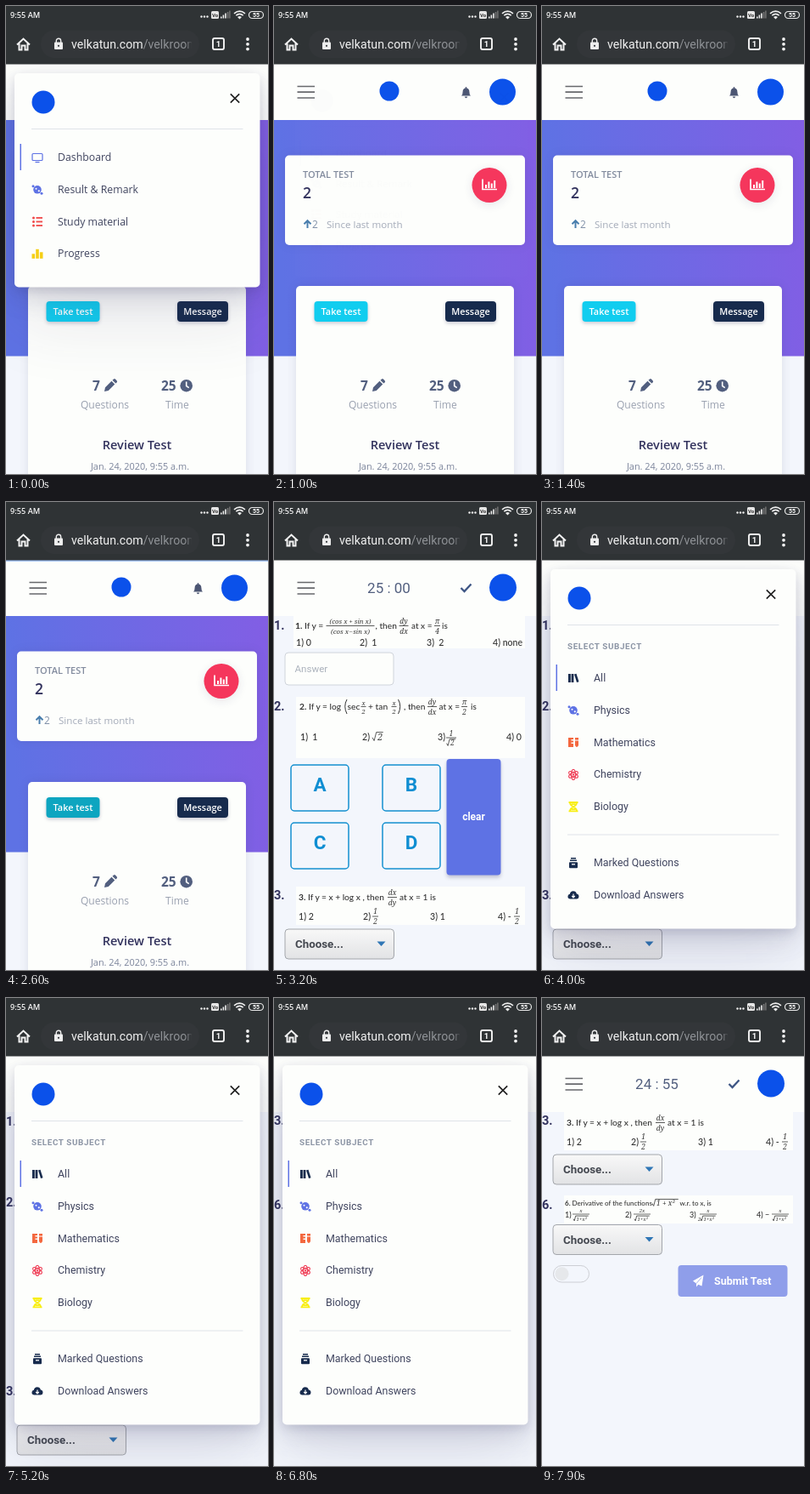
An HTML page that plays this animation: 309x550 px, repeating every 8000 ms.

```html
<!DOCTYPE html>
<html lang="en">
<head>
<meta charset="utf-8">
<title>Study portal</title>
<style>
html,body{margin:0;width:100%;height:100%;overflow:hidden;background:#fff}
svg{display:block;width:100vw;height:100vh}
text{white-space:pre}
.o{font-family:"Open Sans",sans-serif}
.r{font-family:Roboto,sans-serif}
.l{font-family:Lato,sans-serif}
.m{font-family:"Noto Serif","Liberation Serif",serif;font-style:italic}
</style>
</head>
<body>
<svg id="stage" viewBox="0 0 309 550" xmlns="http://www.w3.org/2000/svg"></svg>
<script>
const LOOP = 8000;
const T = {close1: 780, press: 2400, load: 2850, open2: 3760, filter: 6300, close2: 7150};
const NAVY = '#172b4d', INDIGO = '#5e72e4', SLATE = '#525f7f', LOGO = '#0b51ea', INK = '#32325d';
const PAGE = '#f3f6fc', PAPER = '#fdfefc', BAR = '#2f3335', PILL = '#333639', MATH = '#333';

const text = (cls, x, y, s, size, fill, extra = '') =>
  `<text class="${cls}" x="${x}" y="${y}" font-size="${size}" fill="${fill}" ${extra}>${s}</text>`;
const rect = (x, y, w, h, fill, r = 0, extra = '') =>
  `<rect x="${x}" y="${y}" width="${w}" height="${h}" rx="${r}" fill="${fill}" ${extra}/>`;
const dot = (x, y, r, fill, extra = '') => `<circle cx="${x}" cy="${y}" r="${r}" fill="${fill}" ${extra}/>`;
const path = (d, fill, extra = '') => `<path d="${d}" fill="${fill}" ${extra}/>`;
const line = (d, color, w = 1, extra = '') => path(d, 'none', `stroke="${color}" stroke-width="${w}" ${extra}`);
const group = (id, body) => `<g id="${id}">${body}</g>`;
const at = (x, y, body) => `<g transform="translate(${x} ${y})">${body}</g>`;
const MID = 'text-anchor="middle"', SEMI = 'font-weight="600"', BOLD = 'font-weight="700"';
const MIDSEMI = MID + ' ' + SEMI, MIDBOLD = MID + ' ' + BOLD;

// Browser chrome
function chrome() {
  let s = rect(0, 0, 309, 68.5, BAR) + text('o', 5, 13.5, '9:55 AM', 9.2, '#f4f4f4', SEMI);
  for (const x of [230.5, 234, 237.5]) s += dot(x, 12.5, 1.2, '#eee');
  s += rect(242, 6, 9, 9, '#e6e6e6', 1.5) + text('r', 246.5, 13, 'Vo', 6, '#333', MIDBOLD);
  s += path('M253 14.5h1.6v-2h-1.6zM255.6 14.5h1.6v-4h-1.6zM258.2 14.5h1.6v-6h-1.6z', '#eee')
    + path('M260.8 14.5h1.6v-7.5h-1.6zM263.2 14.5h1.4v-9h-1.4z', '#777');
  s += line('M269 8.8q6.5-5.4 13 0M271.3 11.2q4.2-3.5 8.4 0', '#eee', 1.6)
    + path('M273 13q2.5-2 5 0l-2.5 2.5z', '#eee');
  s += rect(286.5, 6.5, 17, 8, 'none', 4, 'stroke="#e8e8e8" stroke-width="1.2"')
    + text('r', 295, 13.2, '55', 7, '#fff', MIDBOLD);
  s += line('M13 45.5L20.5 38.5L28 45.5M15.5 44V51.5H18.5V46.5H22.5V51.5H25.5V44', '#f2f2f2', 2);
  s += rect(41, 28.5, 187, 32.5, PILL, 16.2);
  s += rect(57, 42.5, 10, 8.5, '#eee', 1) + line('M59.3 43v-2a2.7 2.7 0 0 1 5.4 0v2', '#eee', 1.4)
    + dot(62, 46.8, 1.1, PILL);
  s += '<g clip-path="url(#urlClip)">' + text('r', 77, 50,
    'velkatun.com<tspan fill="#8e9195">/velkroom/in</tspan>', 14.2, '#f1f1f1') + '</g>'
    + rect(211, 36, 9, 18, 'url(#urlFade)');
  s += rect(244, 38, 13, 13, 'none', 2, 'stroke="#f4f4f4" stroke-width="1.9"')
    + text('r', 250.5, 48, '1', 9.5, '#fff', MIDBOLD);
  for (const y of [39, 44.8, 50.6]) s += dot(285, y, 1.9, '#f2f2f2');
  return s;
}

const burger = line('M27.5 94.5h20.5M27.5 101.2h20.5M27.5 108h20.5', '#67686c', 1.7);
const header = rect(0, 68, 309, 66, PAPER) + burger;
const shadow = (x, y, w, h, r, opacity, blur = 'soft') =>
  rect(x, y, w, h, INK, r, `opacity="${opacity}" filter="url(#${blur})"`);

function dashboard() {
  let s = rect(0, 68, 309, 482, PAGE) + rect(0, 134, 309, 277.5, 'url(#band)') + header;
  s += dot(136, 100, 11.5, LOGO) + dot(269.5, 101, 15.5, LOGO);
  s += path('M221 105.5q1.6-1.5 1.6-4.5q0-4 3.1-4.6v-1.2h1.6v1.2q3.1.6 3.1 4.6q0 3 1.6 4.5zM224.8 106.5h3.4q-.3 1.7-1.7 1.7t-1.7-1.7z', '#4c5673');
  s += shadow(13, 175.5, 283, 105.5, 5, .12) + rect(13, 175.5, 283, 105.5, PAPER, 5);
  s += text('o', 34, 202, 'TOTAL TEST', 11, '#828b9e', SEMI) + text('o', 34, 226, '2', 17.5, INK, SEMI);
  s += line('M39.5 261V253M35.5 256.2L39.5 252.2L43.5 256.2', '#4a7fae', 2)
    + text('o', 45, 260.5, '2', 12, '#8090a8') + text('o', 62, 260.5, 'Since last month', 11.6, '#a3aab8');
  s += shadow(234, 193, 40, 40, 20, .12) + dot(254, 210.5, 20.5, '#f5365c')
    + line('M246 203.5V215.5H263', '#fff', 1.7)
    + path('M249 210h2v4h-2zM252.4 206.5h2v7.5h-2zM255.8 208.5h2v5.5h-2zM259.2 205h2v9h-2z', '#fff');
  s += shadow(26, 329, 257, 240, 5, .13) + rect(26, 329, 257, 240, PAPER, 5);
  const btn = (x, w, fill, id, label) => shadow(x, 349, w, 24, 4, .25, 'tight')
    + rect(x, 347, w, 24, fill, 4, `id="${id}"`) + text('o', x + w / 2, 363, label, 10.9, '#fff', MIDSEMI);
  s += btn(47.5, 63, '#11cdef', 'take', 'Take test') + btn(202, 60, NAVY, 'msg', 'Message');
  s += text('o', 102, 452, '7', 15.5, SLATE, BOLD)
    + path('M116 453l1-4.8l7.5-7.5l3.8 3.8l-7.5 7.5zM125.5 439.7l1.5-1.3q1-.8 2 .2l1.6 1.6q1 1 .2 2l-1.4 1.4z', SLATE);
  s += text('o', 183, 452, '25', 15.5, SLATE, BOLD) + dot(212.7, 446.2, 7.3, SLATE)
    + line('M212.7 441.5V446.5L215.7 448.7', '#fff', 1.6);
  s += text('o', 116.5, 472.5, 'Questions', 12.1, '#9aa1b0', MID) + text('o', 202, 472.5, 'Time', 12.1, '#9aa1b0', MID);
  s += text('o', 154.5, 520.5, 'Review Test', 14.6, INK, MIDSEMI)
    + text('o', 158, 545, 'Jan. 24, 2020, 9:55 a.m.', 10.9, '#7a839a', MID);
  return s + rect(0, 67.5, 309, 2.5, '#a9c8f8', 0, 'id="bar"');
}

// Exam content
const lato = (x, y, s, size = 10.6) =>
  text('l', x, y, s.replace(/^\d\./, n => `<tspan ${BOLD}>${n}</tspan>`), size, MATH, 'font-weight="500"');
const frac = (cx, y, top, bottom, w, size = 8.4, gap = 1) =>
  text('m', cx, y - 6 - gap, top, size, MATH, MID) + line(`M${cx - w / 2} ${y - 4}h${w}`, MATH, .8)
  + text('m', cx, y + 4 + gap, bottom, size, MATH, MID);
const num = (y, s) => text('r', 0, y, s, 14.5, INK, BOLD);
const root = (x, y, s, w, size) => text('m', x + size * .6, y, s, size, MATH)
  + line(`M${x} ${y - size * .3}l${size * .2} ${size * .35}l${size * .25} ${-size * .95}h${w}`, MATH, .8);
const strip = (x, y, w, h) => rect(x, y, w, h, PAPER);
const choose = y => rect(13, y, 128.5, 35, 'url(#sel)', 4, 'stroke="#a3a6ab"')
  + text('r', 25, y + 22, 'Choose...', 13.3, '#43474f', BOLD)
  + path(`M121.5 ${y + 14.5}h10l-5 5.5z`, '#2f76b5');

function question1() {
  let s = strip(23, 131, 273, 41) + num(150, '1.') + lato(25, 149, '1. If y =', 10.3);
  s += frac(90, 149.5, '(cos x + sin x)', '(cos x−sin x)', 57, 7.8) + lato(119.5, 149, ', then', 10.2)
    + frac(153, 149.5, 'dy', 'dx', 11) + lato(162, 149, 'at x =', 10) + frac(192.5, 149.5, 'π', '4', 7) + lato(198, 149, 'is', 10);
  s += lato(26, 169, '1) 0') + lato(101, 169, '2)  1') + lato(180, 169, '3)  2') + lato(258, 169, '4) none');
  return s + rect(13, 177, 128, 38, PAPER, 4, 'stroke="#cfd4db"') + text('r', 24.5, 200, 'Answer', 11.6, '#abb2bc');
}

function question2() {
  const key = (x, y, c) => rect(x, y, 68, 54, PAGE, 4, 'stroke="#1490d0" stroke-width="1.5"')
    + text('r', x + 34, y + 31, c, 22.5, '#0f8ed2', MIDBOLD);
  let s = strip(26, 229, 270, 72) + num(245, '2.') + lato(30, 244, '2. If y = log', 10.2);
  s += line('M86 232q-4.5 8 0 17M146.500 232q4.5 8 0 17', MATH, 1) + lato(86.5, 244, 'sec', 10.3) + frac(105.5, 244.5, 'x', '2', 6, 7.5, 0)
    + lato(111, 244, '+ tan', 10.3) + frac(141.5, 244.5, 'x', '2', 6, 7.5, 0) + lato(153, 244, ', then', 10.2);
  s += frac(186.5, 244.5, 'dy', 'dx', 11) + lato(194.5, 244, 'at x =', 10) + frac(224.5, 244.5, 'π', '2', 7) + lato(232, 244, 'is', 10);
  s += lato(31, 280, '1)  1') + lato(104, 280, '2)') + root(116, 280, '2', 8, 10.5) + lato(193, 280, '3)')
    + text('m', 209, 274.5, '1', 8, MATH, MID) + line('M203 277h12', MATH, .8) + root(203.5, 286, '2', 7, 8) + lato(274, 280, '4) 0');
  s += key(20, 309, 'A') + key(128, 309, 'B') + key(20, 377, 'C') + key(128, 377, 'D');
  return s + shadow(203.5, 305, 64, 136.5, 4, .25, 'tight') + rect(203.5, 302, 64, 136.5, INDIGO, 4)
    + text('r', 235.5, 374, 'clear', 12, '#fff', MIDBOLD);
}

function question3() {
  let s = strip(26, 452, 270, 45) + num(467, '3.') + lato(29, 468, '3. If y = x + log x , then', 10.2);
  s += frac(139.5, 468.5, 'dx', 'dy', 11) + lato(148, 468, 'at x = 1 is', 10.2);
  s += lato(29, 491, '1) 2') + lato(105, 491, '2)') + frac(119.5, 491, '1', '2', 7) + lato(184, 491, '3) 1')
    + lato(264, 491, '4) -') + frac(286.5, 491, '1', '2', 7);
  return s + choose(502);
}

function question6() {
  const small = (cx, top, lead = '') => text('m', cx, 252, top, 6, MATH, MID) + line(`M${cx - 10} 254h20`, MATH, .7)
    + text('m', cx - 12, 261.5, lead, 6, MATH) + root(cx - 9, 261.5, '1+x²', 15, 6);
  let s = strip(26, 232, 270, 33) + num(248, '6.') + lato(27, 244, '6. Derivative of the functions', 8)
    + root(130, 244, '1 + x²', 27, 8.4) + lato(162.5, 244, 'w.r. to x, is', 8);
  s += lato(27, 257.5, '1)', 9) + small(46, 'x') + lato(98, 257.5, '2)', 9) + small(118, '2x')
    + lato(174, 257.5, '3)', 9) + small(196, 'x', '2') + lato(253, 257.5, '4) −', 9) + small(281, 'x');
  s += choose(266.5) + rect(13.5, 314.5, 42, 19.5, PAGE, 9.7, 'stroke="#cdcfd4"') + dot(23.5, 324.2, 8, '#e6e8eb');
  s += rect(160.5, 314, 129, 37, '#8f9eea', 4) + path('M178 332.5l12.5-7l-2 13l-4.2-1.8l-2.3 2.8v-4z', '#fff')
    + line('M182 335.5l6-7', '#8f9eea', .8);
  return s + text('r', 203, 336.5, 'Submit Test', 12.5, '#fff', BOLD);
}

function exam() {
  let s = rect(0, 68, 309, 482, PAGE) + group('firstSet', question1() + question2())
    + group('third', question3()) + group('last', question6()) + header;
  s += `<text id="clock" class="r" x="135.5" y="107" font-size="17" fill="${SLATE}" ${MID}></text>`;
  return s + line('M220.5 101l4 4l8-8.5', '#3d5584', 2.3) + dot(270, 100.5, 16, LOGO);
}

// Menus
const icon = {
  screen: rect(-6, -4.5, 12, 8, 'none', 1, `stroke="${INDIGO}" stroke-width="1.2"`) + line('M-2.5 5.5h5', INDIGO, 1.3),
  planet: dot(0, 0, 4.8, INDIGO) + dot(-5, -4, 1.5, INDIGO) + dot(5, 4.5, 1.5, INDIGO) + dot(-1.5, -1, 1, '#fff') + dot(1.8, 1.5, 1.1, '#fff'),
  list: [-4.5, 0, 4.5].map(y => dot(-4.5, y, 1.5, '#f04848') + rect(-1.5, y - .9, 7.5, 1.8, '#f04848')).join(''),
  bars: rect(-6.5, 0, 3.6, 5.5, '#f5cf16') + rect(-1.8, -5.5, 3.6, 11, '#f5cf16') + rect(2.9, -2, 3.6, 7.5, '#f5cf16'),
  books: rect(-6, -5, 2.8, 10, NAVY) + rect(-2.4, -5, 2.8, 10, NAVY) + path('M1-4.5l2.5-.8l3 9.5l-2.5.8z', NAVY),
  ruler: path('M-6-5.5h6v2h-2.5v1.5h2.5v2h-2.5v1.5h2.5v4h-6zM2-5.5h4v9q-2 4-4 0z', '#f4683f') + line('M2-2.5h4', '#fff', 1),
  atom: [0, 60, 120].map(a => `<ellipse rx="6" ry="2.5" fill="none" stroke="#ef3d55" stroke-width="1.1" transform="rotate(${a + 30})"/>`).join('') + dot(0, 0, 1.2, '#ef3d55'),
  helix: line('M-5.5-5.2h11M-5.5 5.2h11M-4-5q0 3 4 5t4 5M4-5q0 3-4 5t-4 5M-2.5-3h5M-2.5 3h5', '#f8ee12', 1.8),
  box: rect(-5, -1, 10, 7, NAVY, 1) + line('M-4-3h8M-3-5.5h6', NAVY, 1.4) + line('M-2 1.5h4', '#fff', 1.3),
  cloud: path('M-4 4.5q-3-.5-2.5-3.5q.3-2 2.3-2.3q.7-3.5 4-3.5q3.3 0 4 3.3q2.7.3 2.7 3.2q0 2.5-2.5 2.8z', NAVY) + line('M0-1.5v4M-1.8 1l1.8 1.8l1.8-1.8', '#fff', 1.2)
};
const item = (cls, y, name, label) => at(37, y - 4, icon[name]) + text(cls, 61, y, label, cls === 'o' ? 12.3 : 12.45, '#40455f');

function menu(h, barY, body) {
  const shade = (dy, blur, opacity) => shadow(10, 79 + dy, 289.5, h, 5, opacity, blur);
  return shade(43, 'wide', .1) + shade(13, 'mid', .15) + shade(4, 'soft', .14) + rect(10, 79, 289.5, h, PAPER, 5)
    + dot(44, 113, 13.5, LOGO) + line('M264.8 103.3l10.4 10.4M275.2 103.3l-10.4 10.4', '#222', 1.7)
    + line('M30 144.5h249.5', '#dfe3e9', 1) + rect(16.5, barY, 1.5, 31, INDIGO) + body;
}
const mainMenu = () => menu(251.5, 162, item('o', 182, 'screen', 'Dashboard') + item('o', 219.8, 'planet', 'Result &amp; Remark')
  + item('o', 257.5, 'list', 'Study material') + item('o', 295.3, 'bars', 'Progress'));
const subjectMenu = () => menu(422.5, 191, text('r', 30, 173, 'SELECT SUBJECT', 9.9, '#8c95a5', BOLD + ' letter-spacing=".6"')
  + [['books', 'All'], ['planet', 'Physics'], ['ruler', 'Mathematics'], ['atom', 'Chemistry'], ['helix', 'Biology']]
    .map(([n, l], i) => item('r', 211 + i * 37.8, n, l)).join('')
  + line('M30 391h249.5', '#dfe3e9', 1) + item('r', 428.3, 'box', 'Marked Questions') + item('r', 466, 'cloud', 'Download Answers'));

const blur = (id, d) => `<filter id="${id}" x="-60%" y="-60%" width="220%" height="220%"><feGaussianBlur stdDeviation="${d}"/></filter>`;
const grad = (id, dir, a, b, o = 1) => `<linearGradient id="${id}" ${dir}><stop stop-color="${a}" stop-opacity="${o}"/><stop offset="1" stop-color="${b}"/></linearGradient>`;

const stage = document.getElementById('stage');
stage.innerHTML = '<defs>' + blur('tight', 2) + blur('soft', 6) + blur('mid', 15) + blur('wide', 40)
  + grad('band', 'x2="1" y2="-.05"', INDIGO, '#825ee4') + grad('sel', 'x2="0" y2="1"', '#f8f8f8', '#e2e3e5') + grad('urlFade', '', PILL, PILL, 0)
  + '<clipPath id="urlClip"><rect x="76" y="34" width="143" height="24"/></clipPath></defs>'
  + group('dash', dashboard()) + group('exam', exam()) + group('menu1', mainMenu()) + group('menu2', subjectMenu()) + chrome();

const $ = id => document.getElementById(id);
const show = (id, on) => $(id).setAttribute('display', on ? 'inline' : 'none');
const ease = (t, start, dur = 250) => {
  const p = Math.min(1, Math.max(0, (t - start) / dur));
  return 1 - Math.pow(1 - p, 2.4);
};
function pose(id, k) {
  const z = .95 + .05 * k;
  show(id, k > 0);
  $(id).setAttribute('opacity', k);
  $(id).setAttribute('transform', `translate(299.5 79) scale(${z}) translate(-299.5 -79)`);
}

function update(t) {
  const inExam = t >= T.load, filtered = t >= T.filter;
  show('dash', !inExam);
  show('exam', inExam);
  show('bar', t >= T.press + 100);
  $('take').setAttribute('fill', t >= T.press ? '#0da5c0' : '#11cdef');
  show('firstSet', !filtered);
  show('last', filtered);
  $('third').setAttribute('transform', `translate(0 ${filtered ? -318 : 0})`);
  const left = 1500 - Math.max(0, Math.floor((t - 2700) / 1000));
  $('clock').textContent = Math.floor(left / 60) + ' : ' + String(left % 60).padStart(2, '0');
  pose('menu1', 1 - ease(t, T.close1));
  pose('menu2', ease(t, T.open2) - ease(t, T.close2));
}

const start = performance.now();
function tick() {
  update((performance.now() - start) % LOOP);
  requestAnimationFrame(tick);
}
update(0);
requestAnimationFrame(tick);
</script>
</body>
</html>
```
